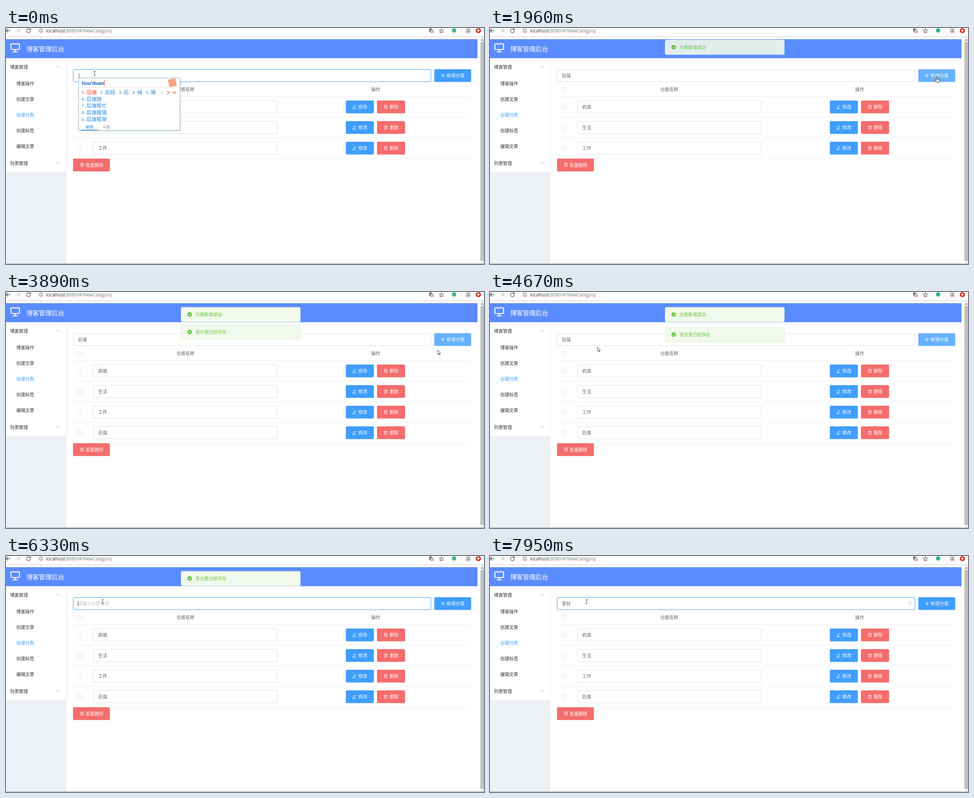
An HTML page that plays this animation: 1063x527 px, repeating every 8000 ms.

```html
<!DOCTYPE html>
<html lang="zh-CN">
<head>
<meta charset="utf-8">
<title>博客管理后台</title>
<style>
  html, body { margin: 0; width: 100%; height: 100%; overflow: hidden; background: #fff; }
  svg { display: block; width: 100%; height: 100%; }
  text { font-family: "Noto Sans CJK SC", "Noto Sans CJK", "Noto Sans", sans-serif; white-space: pre; }
  .url { font-family: "Open Sans", "Noto Sans", sans-serif; }
  .pinyin { font-family: "Liberation Sans", sans-serif; font-weight: bold; }
  .num { font-family: "Liberation Mono", monospace; }
  .thin { font-weight: 300; }
  .line { fill: none; stroke-linecap: round; stroke-linejoin: round; }
</style>
</head>
<body>
<svg id="stage" viewBox="0 0 1063 527" xmlns="http://www.w3.org/2000/svg"></svg>
<script>
const LOOP = 8000;
const BLUE = '#409eff', RED = '#f56c6c', GREEN = '#67c23a', GREY = '#dcdfe6', INK = '#606266';

const TICKS = [0, 120, 580, 720, 860, 1000, 1140, 1290, 1420, 1570, 1690,
  1960, 2100, 2240, 2390, 2530, 2670, 2810, 2950, 3100,
  3370, 3520, 3660, 3800, 3950, 4090, 4240, 4380,
  4520, 4670, 4790, 4940, 5060, 5190, 5310, 5440, 5540,
  5810, 5950, 6080, 6330, 6480, 6620, 6760, 6880, 7030, 7200, 7350, 7550, 7950];

const POINTER = [
  [0, 'beam', 197, 101], [580, 'beam', 250, 104], [720, 'beam', 420, 111], [860, 'beam', 610, 112],
  [1000, 'arrow', 790, 119], [1140, 'beam', 915, 113], [1290, 'hand', 1000, 116],
  [1420, 'hand', 1005, 113], [1570, 'hand', 998, 114], [1690, 'hand', 995, 115], [3100, 'hand', 991, 112],
  [3800, 'arrow', 960, 130], [3950, 'arrow', 820, 193], [4090, 'arrow', 640, 235],
  [4240, 'arrow', 440, 193], [4380, 'arrow', 301, 140], [4520, 'arrow', 262, 133],
  [4670, 'arrow', 239, 123], [4790, 'beam', 224, 108], [4940, 'beam', 217, 104], [5060, 'beam', 215, 102]];

const BUTTON = [[0, BLUE], [1290, '#66b1ff'], [1420, '#3a8ee6'], [1570, '#66b1ff'], [5060, BLUE]];
const BORDER = [[0, BLUE], [1420, '#83bcf8'], [1570, GREY], [4790, '#c0c4cc'], [5060, BLUE]];
const FIELD = [[0, ''], [120, '后端'], [5810, ''], [7350, '爱好']];
const PINYIN = [[0, "hou'duan"], [120, ''], [6480, 'a'], [6620, 'ai'], [6760, "ai'h"],
  [6880, "ai'ha"], [7030, "ai'hao"], [7350, '']];
const CARET = [[0, 0], [120, 181], [580, 0], [5190, 181], [5440, 0], [5810, 160.5], [6480, 0], [7350, 179.5], [7950, 0]];
const WORDS = {
  h: '后端 后段 后 候 猴 后端做 后端帮忙 后端报错 后端框架',
  a: '啊 阿 吖 呵 嗄 啊啊 阿姨 啊哈 阿胶',
  ai: '爱好 爱 哎 矮 挨 爱好者 爱好和平 爱好广泛 爱好运动'
};

const last = (list, t) => list.filter(e => e[0] <= t).pop();
const at = (list, t) => last(list, t)[1];
const clamp = v => Math.min(1, Math.max(0, v));

// CSS "ease": cubic-bezier(.25, .1, .25, 1)
function ease(x) {
  x = clamp(x);
  const bez = (a, b, u) => 3 * a * u * (1 - u) ** 2 + 3 * b * u * u * (1 - u) + u ** 3;
  let lo = 0, hi = 1;
  for (let i = 0; i < 24; i++) {
    const mid = (lo + hi) / 2;
    if (bez(.25, .25, mid) < x) lo = mid; else hi = mid;
  }
  return bez(.1, 1, lo);
}

const rect = (x, y, w, h, fill, more = '') =>
  `<rect x="${x}" y="${y}" width="${w}" height="${h}" fill="${fill}" ${more}/>`;
const box = (x, y, w, h, stroke, r = 2.8, fill = '#fff') =>
  rect(x + .5, y + .5, w - 1, h - 1, fill, `stroke="${stroke}" rx="${r}"`);
const circle = (x, y, r, fill, more = '') => `<circle cx="${x}" cy="${y}" r="${r}" fill="${fill}" ${more}/>`;
const line = (d, stroke, w = 1, more = '') =>
  `<path class="line" d="${d}" stroke="${stroke}" stroke-width="${w}" ${more}/>`;
// Text is placed by its vertical middle.
const text = (x, y, s, fill = INK, size = 9.9, more = '') =>
  `<text x="${x}" y="${y + size * .37}" font-size="${size}" fill="${fill}" ${more}>${s}</text>`;
const move = (x, y, s, more = '') => `<g transform="translate(${x} ${y})" ${more}>${s}</g>`;

const trash = (x, y) => move(x, y,
  line('M-4-2.5H4M-1.5-2.5V-4H1.5V-2.5M-3-2.5V4H3V-2.5M-1-.5V2M1-.5V2', '#fff', .8));
const pencil = (x, y) => move(x, y,
  line('M-2.8 1.2 1.6-3.9 3.4-2.4-1 2.8-3.2 3.3ZM-3.5 4.2H3.5', '#fff', .9));
const button = (x, y, w, fill, icon, label, labelX) =>
  rect(x, y, w, 28.5, fill, 'rx="2.3"') + icon + text(labelX, y + 14.2, label, '#fff');
const checkbox = y => box(159, y - 5, 10, 10, GREY, 1.5);

function toolbar() {
  const dark = '#5a5d61';
  return rect(0, 0, 1063, 20, '#fff') + rect(0, 19, 1063, 1, '#c9cbcd') +
    line('M9 6H1M4.5 2 .5 6 4.5 10', dark, 1.3) +
    line('M23 6H31M27.5 2 31.5 6 27.5 10', '#c4c6c8', 1.3) +
    line('M53.2 3.3A4.3 4.3 0 1 0 54 7M54.2 1.4V4.4H51', dark, 1.3) +
    circle(77.5, 6, 4, 'none', `stroke="${dark}"`) + line('M77.5 5.8V8M77.5 3.9V4', dark, 1.1) +
    text(89, 5.9, 'localhost<tspan fill="#75787c">:8080/#/NewCategory</tspan>', '#2b2d30', 10.2, 'class="url"') +
    rect(941, 1, 6, 7, dark, 'rx="1"') + box(944, 4, 7, 7, dark, 1) +
    text(941.5, 4.5, '文', '#fff', 5) + line('M946 9 947.5 6 949 9', dark, .8) +
    line('M968.5 1.2 970 4.5 973.4 4.8 970.8 7.1 971.6 10.5 968.5 8.7 965.4 10.5 966.2 7.1 963.6 4.8 967 4.5Z', dark, 1.1) +
    circle(996.5, 5.5, 5, '#41b883') + rect(1012, 0, 1, 12, '#d5d7da') +
    circle(1028, 6, 6.6, '#d8dadd') + circle(1028, 4, 2.1, '#85888c') +
    `<path d="M1024 9.6Q1024 7 1028 7T1032 9.6Z" fill="#85888c"/>` +
    circle(1050.5, 6, 5.8, '#d93025') +
    `<path d="M1050.5 2.5 1053.8 6H1051.7V9H1049.3V6H1047.2Z" fill="#fff"/>`;
}

function shell() {
  const items = ['博客操作', '创建文章', '创建分类', '创建标签', '编辑文章'];
  return rect(0, 0, 1063, 527, '#fff') +
    rect(0, 25, 1048.5, 42.5, '#5b8cff') +
    box(10.5, 34.5, 20, 14, '#fff', 2, 'none') +
    line('M12 35.5H29Q30 35.5 30 36.5V47Q30 48 29 48H12Q11 48 11 47V36.5Q11 35.5 12 35.5ZM20.5 48V53M16 53.2H25', '#fff', 2.1) +
    text(45, 46.8, '博客管理后台', '#fff', 14.1) +
    rect(0, 321.5, 134.5, 205, '#edf1f5') + rect(134, 67.5, 1, 254, '#e6e6e6') +
    text(9, 87, '博客管理', '#303133') + text(9, 302, '列表管理', '#303133') +
    line('M113 87.7 116.3 84.4 119.6 87.7M113 299.3 116.3 302.6 119.6 299.3', '#a3a6ac', .9) +
    items.map((s, i) => text(23, 124.3 + 35.1 * i, s, i == 2 ? BLUE : '#303133')).join('') +
    rect(1055, 20, 8, 507, '#f1f1f1') + rect(1055, 31, 8, 489, '#c1c1c1') +
    `<path d="M1056.5 28 1059.3 25 1062 28Z" fill="#606060"/>` +
    rect(0, 526, 1063, 1, '#9a9a9a');
}

function table(t) {
  const rows = ['前端', '生活', '工作'];
  if (t >= 2100) rows.push('后端');
  const head = 'font-weight="700" text-anchor="middle"';
  const end = 153 + 46 * rows.length;
  return checkbox(137.5) + text(399, 137.7, '分类名称', '#909399', 9.9, head) +
    text(822, 137.7, '操作', '#909399', 9.9, head) + rect(149, 153, 885, 1, '#ebeef5') +
    rows.map((name, i) => {
      const y = 162 + 46 * i;
      return checkbox(y + 15) + box(194, y, 410, 28.6, GREY) + text(205, y + 14.2, name) +
        button(755.7, y, 62.3, BLUE, pencil(775, y + 14), '修改', 783.5) +
        button(825, y, 62.5, RED, trash(844.7, y + 14.2), '删除', 853) +
        rect(149, y + 37, 885, 1, '#ebeef5');
    }).join('') +
    button(149, end + 139 - 139 + .7, 82, RED, trash(169, end + 14.7), '批量删除', 177);
}

function field(t) {
  const value = at(FIELD, t), caret = at(CARET, t);
  const clear = value && (t < 1420 || t >= 4790);
  return box(149, 92, 796.5, 28.4, at(BORDER, t)) +
    (value ? text(160, 106, value) : at(PINYIN, t) ? '' : text(160, 106, '请输入分类名称', '#c0c4cc')) +
    (caret ? rect(caret - .5, 100, 1, 12, '#444') : '') +
    (clear ? circle(933.5, 105.7, 4.2, 'none', 'stroke="#c0c4cc" stroke-width=".9"') +
      line('M932 104.2 935 107.2M935 104.2 932 107.2', '#c0c4cc', .9) : '') +
    button(952.5, 92, 82, at(BUTTON, t), line('M968 106H976M972 102V110', '#fff', 1), '新增分类', 980);
}

function message(t, open, close, top, label) {
  if (t < open || t > close + 300) return '';
  const leaving = t >= close, since = t - (leaving ? close : open);
  const shown = d => leaving ? 1 - ease(since / d) : ease(since / d);
  return move(389, top - 33.6 * (1 - shown(400)),
    box(0, 0, 266, 33.6, '#e1f3d8', 2.8, '#f0f9eb') + circle(19.5, 16.6, 5, GREEN) +
    line('M17.3 16.7 19 18.4 22 15.2', '#f0f9eb', 1.1) + text(32, 16.8, label, GREEN),
    `opacity="${shown(300)}"`);
}

function ime(t) {
  const typed = at(PINYIN, t);
  if (!typed) return '';
  const words = WORDS[typed[0] == 'h' ? 'h' : typed == 'a' ? 'a' : 'ai'].split(' ');
  const size = 11.3;
  let x = 168;
  const list = words.map((w, i) => {
    const px = i < 5 ? x : 168, py = i < 5 ? 143.5 : 158.5 + 15.2 * (i - 5);
    const fill = i ? '#2389d7' : '#ee4035';
    x += 11 + size * w.length + 7.8;
    return text(px, py, `${i + 1}.`, fill, 9.6, 'class="num"') + text(px + 11, py, w, fill, size, 'class="thin"');
  }).join('');
  const width = [...typed].reduce((s, c) => s + ({ "'": .238, a: .556, i: .278 }[c] || .611) * 11.2, 0);
  return rect(160, 110, 1, 0, 'none') + line('M162.5 101V110.5M160.5 110.5H162.5', '#555', .9) +
    rect(163, 113, 226, 118, '#000', 'opacity=".1" rx="2"') +
    box(161, 111, 226.5, 118, '#94b6d2', 1.5) +
    text(168.5, 122.4, typed, '#0a5fc0', 11.2, 'class="pinyin"') +
    rect(168.5 + width, 116, 1, 13, '#f03c32') +
    rect(162, 132, 224.5, 1, '#f6ddd2') +
    rect(361.5, 113.5, 17, 17, '#f8a587', 'rx="2" transform="rotate(-12 370 122)"') + list +
    line('M349 141 346 144.3 349 147.6', '#c4c4c4', 1.1) +
    line('M359 141 362.5 144.3 359 147.6M371 142.7 374.4 146 377.8 142.7', '#f0563f', 1.5) +
    text(177, 221.3, '联想', '#1c7fd0', 8.5) + text(214, 221.3, '斗图', '#8a8a8a', 8.5) +
    rect(167, 227, 37, 1.5, '#2f8fdc');
}

const SHAPES = {
  beam: line('M-2-4.5H-.5L0-4 .5-4.5H2M0-4V4M-2 4.5H-.5L0 4 .5 4.5H2', '#333', .9),
  arrow: '<path d="M0 0V9.3L2.2 7.3 3.7 10.8 5.2 10.2 3.7 6.8H6.6Z" fill="#fff" stroke="#222" stroke-width=".8"/>',
  hand: '<path d="M-2.2-6Q-1.2-6.8-.3-6V-1.8L3.4-.9Q4.6-.5 4.5 .8L3.6 6.2H-1.3L-4.4 1.8Q-4.6.4-3.2.6L-2.2 1.5Z" ' +
    'fill="#fff" stroke="#222" stroke-width=".9"/>' + line('M.9-1.4V1M2.6-1V1.2', '#222', .6)
};

function pointer(t) {
  const [, kind, x, y] = last(POINTER, t);
  return move(x, y, SHAPES[kind]);
}

function scene(t) {
  const lift = 45 * (1 - ease((t - 4770) / 400));
  return shell() + table(t) + field(t) +
    message(t, 1770, 4770, 33.7, '分类新增成功') +
    message(t, 3590, 6600, 33.7 + lift, '该分类已经存在') +
    toolbar() + ime(t) + pointer(t);
}

const stage = document.getElementById('stage');
const start = performance.now();
let shownTick = -1;

function draw() {
  const now = (performance.now() - start) % LOOP;
  const tick = TICKS.filter(v => v <= now).pop();
  if (tick !== shownTick) {
    shownTick = tick;
    stage.innerHTML = scene(tick);
  }
  requestAnimationFrame(draw);
}
draw();
</script>
</body>
</html>
```
